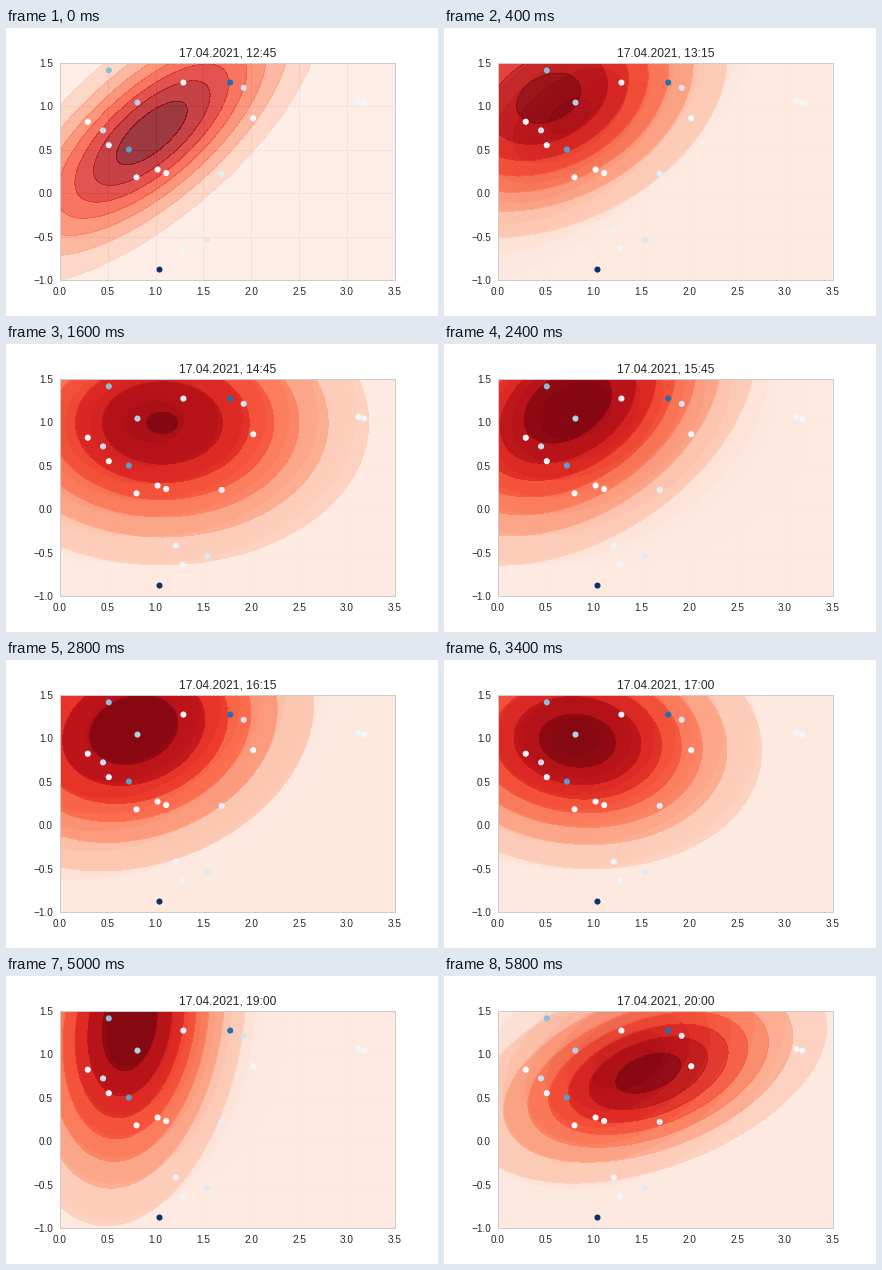
A matplotlib script that plays this animation: 432 px wide and 288 px high, repeating every 6000 ms.

```python
import numpy as np
import matplotlib.pyplot as plt
from matplotlib.animation import FuncAnimation
from matplotlib.ticker import MaxNLocator

FRAMES, INTERVAL = 30, 200
ALPHA, TRAIL = 0.8, 5
START_MINUTE, STEP_MINUTES = 12 * 60 + 45, 15
FADE = 0.75

plt.rcParams.update({
    "font.family": "Liberation Sans",
    "font.size": 10,
    "text.color": ".15",
    "axes.edgecolor": ".8",
    "axes.linewidth": 1,
    "axes.grid": True,
    "axes.axisbelow": True,
    "grid.color": ".8",
    "grid.linewidth": 1,
    "xtick.color": ".15",
    "ytick.color": ".15",
    "xtick.major.size": 0,
    "ytick.major.size": 0,
    "xtick.major.pad": 7,
    "ytick.major.pad": 7,
})

# key poses of the cloud by step: centre x, y, spread x, y, correlation
POSES = {
    0: (0.96, 0.69, 0.87, 0.86, 0.72),
    2: (0.53, 1.09, 0.93, 0.80, 0.30),
    8: (1.07, 0.99, 1.09, 0.825, 0),
    12: (0.73, 1.18, 0.97, 0.90, 0.36),
    17: (0.83, 0.97, 0.955, 0.73, -0.08),
    25: (0.73, 1.36, 0.60, 1.15, 0.20),
    29: (1.57, 0.78, 0.93, 0.63, 0.42),
}

# stations, darkest first; each is paler than the one before
STATIONS = [
    (1.04, -0.88), (1.78, 1.27), (0.72, 0.50), (0.51, 1.41), (0.81, 1.04),
    (0.45, 0.72), (1.92, 1.21), (1.54, -0.54), (1.69, 0.22), (1.29, 1.27),
    (1.21, -0.42), (1.28, -0.64), (3.12, 1.06), (3.18, 1.04), (0.51, 0.55),
    (2.02, 0.86), (0.29, 0.82), (1.11, 0.23), (1.02, 0.27), (0.80, 0.18),
]

X, Y = np.meshgrid(np.linspace(0, 3.5, 150), np.linspace(-1, 1.5, 150))

fig = plt.figure(figsize=(6, 4), dpi=72, facecolor="white")
ax = fig.add_axes([0.125, 0.125, 0.775, 0.755])


def pose(i):
    return [np.interp(i, list(POSES), track) for track in zip(*POSES.values())]


def clock(i):
    hour, minute = divmod(START_MINUTE + STEP_MINUTES * i, 60)
    return f"17.04.2021, {hour:02d}:{minute:02d}"


def draw_cloud(i):
    """Filled contours of a correlated normal density."""
    mx, my, sx, sy, rho = pose(i)
    u, v, w = (X - mx) / sx, (Y - my) / sy, 1 - rho**2
    peak = 1 / (2 * np.pi * sx * sy * np.sqrt(w))
    z = peak * np.exp(-(u * u - 2 * rho * u * v + v * v) / (2 * w))
    levels = MaxNLocator(8).tick_values(0, peak)
    ax.contourf(X, Y, z, levels=levels, cmap="Reds",
                vmin=0, vmax=levels[-1], alpha=ALPHA)


def draw_stations():
    x, y = zip(*STATIONS)
    ax.scatter(x, y, s=25, c=FADE ** np.arange(len(x)),
               cmap="Blues", vmin=0, vmax=1)


def draw(i):
    ax.clear()
    # older layers shine through the translucent newer ones
    for k in range(max(0, i - TRAIL + 1), i + 1):
        draw_cloud(k)
        draw_stations()
    ax.set(xlim=(0, 3.5), ylim=(-1, 1.5),
           xticks=np.arange(0, 3.6, 0.5), yticks=np.arange(-1, 1.6, 0.5))
    ax.set_title(clock(i), fontsize=12)
    return []


anim = FuncAnimation(fig, draw, frames=FRAMES, interval=INTERVAL,
                     repeat=True, repeat_delay=0)
plt.show()
```
